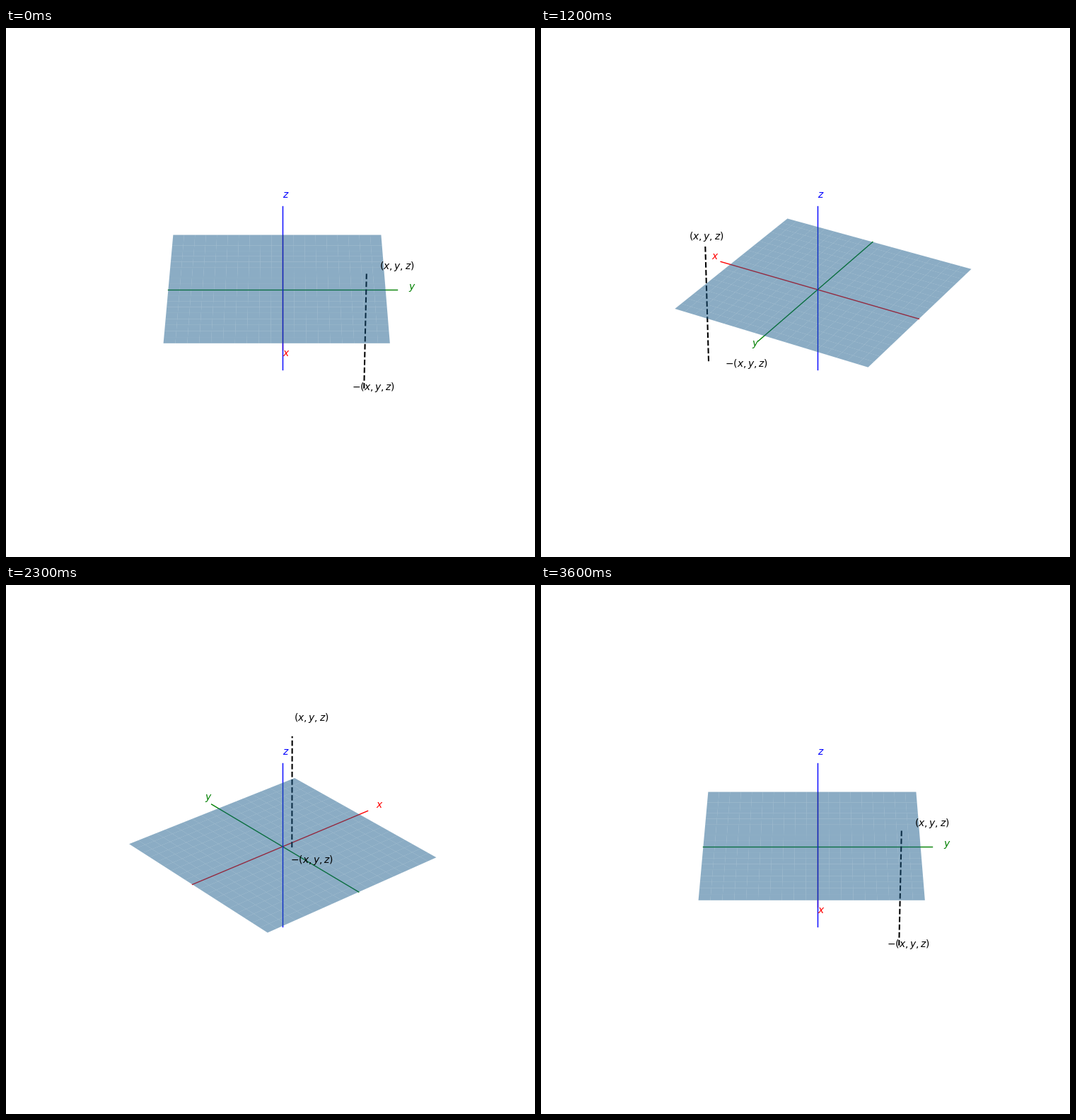
These frames come from a looping animation (748 px wide and 748 px high, 3700 ms). A matplotlib script:

```python
import numpy as np
import matplotlib.pyplot as plt
from matplotlib.animation import FuncAnimation

SIZE, DPI = 748, 100
FRAMES, STEP = 37, 10
R = 10
PAD = 25 / 24  # room around the data box

plt.rcParams["font.family"] = "DejaVu Sans"
plt.rcParams["font.size"] = 10

fig = plt.figure(figsize=(SIZE / DPI, SIZE / DPI), dpi=DPI, facecolor="white")
ax = fig.add_subplot(projection="3d")
ax.set_axis_off()

# Plane z = 0
xx, yy = np.meshgrid(np.arange(-R, R), np.arange(-R, R))
ax.plot_surface(xx, yy, np.zeros_like(xx), color="#1f77b4", alpha=0.5)

# Coordinate axes with their labels
for name, color, unit in zip("xyz", ("red", "green", "blue"), np.eye(3)):
    ax.plot(*np.outer(unit, (-R, R)), color=color, lw=1)
    ax.text(*(unit * (R + 1)), f"${name}$", color=color)

# A point joined to its mirror image
ax.plot([7, 7], [7, 7], [-7, 7], "k--", lw=1.5)
ax.text(8, 8, 8, "$(x,y,z)$", color="black")
ax.text(6, 6, -8, "$-(x,y,z)$", color="black")

side, height = 1.1 * R * PAD, R * PAD
ax.set(xlim=(-side, side), ylim=(-side, side), zlim=(-height, height))


def update(i):
    ax.view_init(elev=30, azim=i * STEP)
    return []


anim = FuncAnimation(fig, update, frames=FRAMES, init_func=lambda: update(0),
                     interval=100, repeat=True, repeat_delay=0, blit=False)
plt.show()
```
